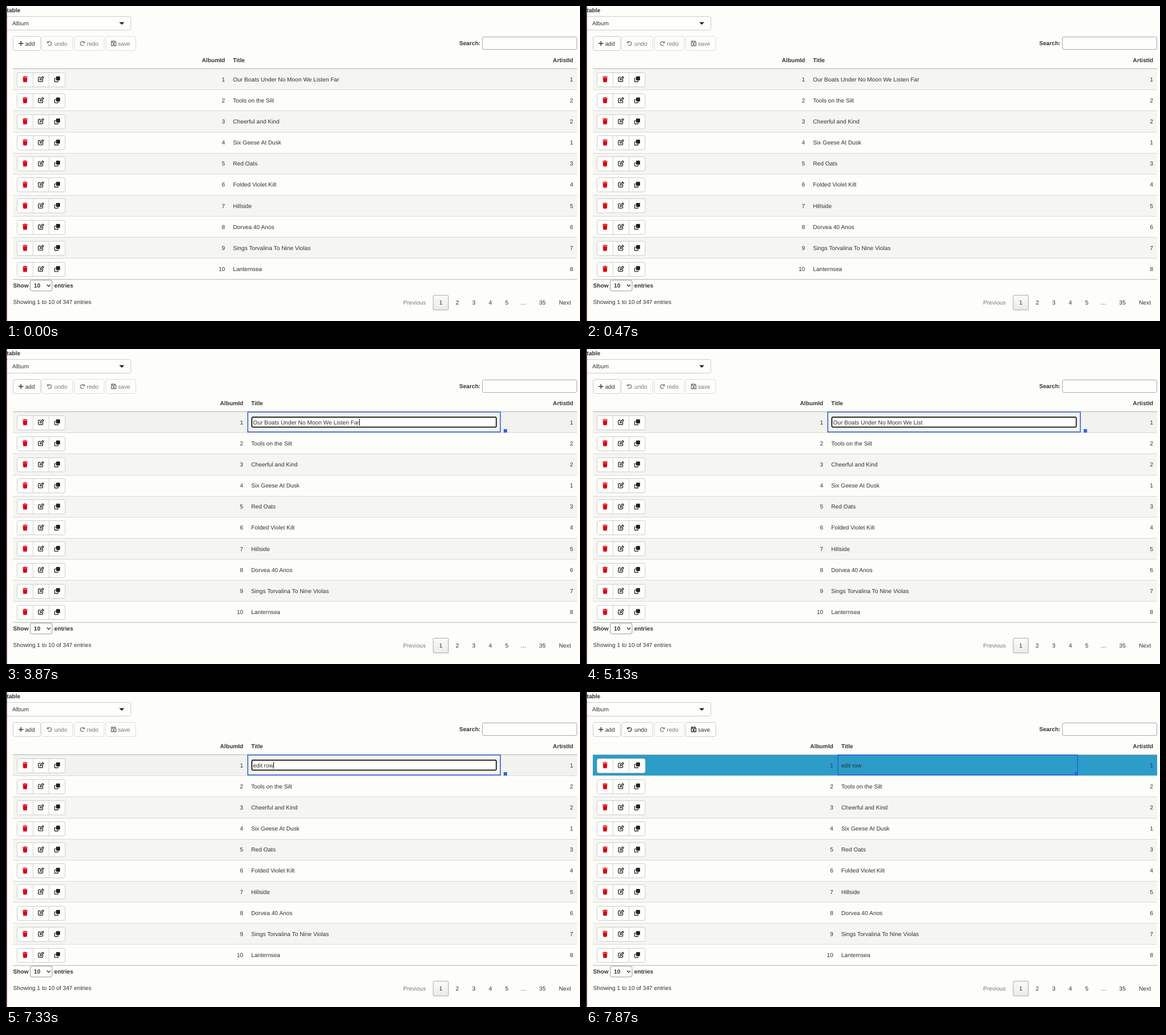
Write an HTML page that moves like this. It is 1009x555 px and loops after 8000 ms.

```html
<!DOCTYPE html>
<html lang="en">
<head>
<meta charset="utf-8">
<title>Editable table</title>
<style>
  html, body { margin: 0; width: 100%; height: 100%; overflow: hidden; background: #fdfdfa; }
  svg { display: block; width: 100%; height: 100%; }
  text { font: 10.2px "Liberation Sans", Arial, sans-serif; fill: #333; white-space: pre; text-rendering: geometricPrecision; }
  .bold { font-weight: bold; }
  .off { opacity: .65; }
  .icon { fill: none; stroke: #333; stroke-width: 1.4; }
</style>
</head>
<body>
<svg id="stage" viewBox="0 0 1009 555">
  <defs>
    <linearGradient id="page" x2="0" y2="1"><stop stop-color="#fbfbf9"/><stop offset="1" stop-color="#ebebe8"/></linearGradient>
    <path id="trash" fill="#e00010" d="M-4.3-4.7h2.6l.6-.8h2.2l.6.8h2.6v1.3h-8.6zM-3.8-2.8h7.6l-.5 7q-.1 1-1 1h-4.6q-.9 0-1-1z"/>
    <g id="edit" class="icon" stroke-width="1.2">
      <path d="M-.5-3.5h-2.7q-1.2 0-1.2 1.2v5.3q0 1.2 1.2 1.2h5.3q1.2 0 1.2-1.2v-2.7"/>
      <path d="M-1.2 1.2l.4-2 4-4 1.7 1.7-4 4z"/>
    </g>
    <g id="copy">
      <path class="icon" d="M-2.5-1.5h-1.2q-.8 0-.8.8v4.4q0 .8.8.8h4.4q.8 0 .8-.8v-1.2"/>
      <rect x="-2" y="-5" width="7" height="7" rx="1.1" fill="#222"/>
    </g>
    <path id="plus" class="icon" d="M-4.2 0h8.4M0-4.2v8.4" stroke-width="1.6"/>
    <g id="turn">
      <path class="icon" d="M-3-1.6a3.5 3.5 0 1 1 .4 4"/>
      <path d="M-4.3-4.2v3.8h3.8z" fill="#333"/>
    </g>
    <g id="disk" class="icon" stroke-width="1.1">
      <path d="M-4-4h6.2l1.8 1.8v6.2h-8z"/>
      <path d="M-2.2-4v2.6h4v-2.6"/>
      <circle cy="1.4" r=".9"/>
    </g>
  </defs>
</svg>
<script>
const LOOP = 8000, PITCH = 37.15, ROW_TOP = 110.6;
const BLUE = '#3161dc';
const titles = [
  'Our Boats Under No Moon We Listen Far', 'Tools on the Silt', 'Cheerful and Kind',
  'Six Geese At Dusk', 'Red Oats', 'Folded Violet Kilt', 'Hillside',
  'Dorvea 40 Anos', 'Sings Torvalina To Nine Violas', 'Lanternsea'
];
const artists = [1, 2, 2, 1, 3, 4, 5, 6, 7, 8];
const stage = document.getElementById('stage');

function add(tag, attrs, parent = stage) {
  const el = document.createElementNS('http://www.w3.org/2000/svg', tag);
  set(el, attrs);
  return parent.appendChild(el);
}
function set(el, attrs) {
  for (const key in attrs) el.setAttribute(key, attrs[key]);
}
function show(el, on) {
  el.style.display = on ? '' : 'none';
}
function label(x, y, content, anchor = 'start', cls = '', parent = stage) {
  const el = add('text', { x, y, 'text-anchor': anchor, class: cls }, parent);
  el.textContent = content;
  return el;
}
function box(x, y, right, bottom, attrs = {}, parent = stage) {
  return add('rect', { x, y, width: right - x, height: bottom - y, fill: '#fefefc', stroke: '#ccc', rx: 3, ...attrs }, parent);
}
function icon(name, x, y, parent = stage, extra = '') {
  return add('use', { href: '#' + name, transform: `translate(${x} ${y}) ${extra}` }, parent);
}
function line(y, stroke) {
  return add('path', { d: `M12 ${y}H1004`, stroke });
}

// Page chrome
box(-4, 18.5, 219.5, 42.5);
add('rect', { width: 1.6, height: 555, fill: '#2c0a20' });
label(1.5, 10.6, 'table', 'start', 'bold');
label(11, 34.2, 'Album');
add('path', { d: 'M199 28.5h9l-4.5 4.4z', fill: '#222' });

function toolButton(left, right, name, content, extra) {
  const g = add('g', {});
  box(left, 53.5, right, 78.5, {}, g);
  icon(name, left + 13.8, 66, g, extra);
  label(right - 9.8, 69.7, content, 'end', '', g);
  return g;
}
toolButton(12.5, 60.5, 'plus', 'add');
const undo = toolButton(62.5, 117.5, 'turn', 'undo');
const redo = toolButton(120.5, 172.5, 'turn', 'redo', 'scale(-1 1)');
const save = toolButton(175.5, 228, 'disk', 'save');
redo.setAttribute('class', 'off');

label(834, 69.2, 'Search:', 'end', 'bold');
box(837.5, 54.5, 1003.5, 76.5, { stroke: '#aaa', rx: 2.5 });

// Table; the id and title columns slide together
const rowFills = titles.map((_, i) => add('rect', {
  x: 12, y: ROW_TOP + i * PITCH, width: 992, height: PITCH, fill: i % 2 ? '#fdfdfa' : '#f5f5f2'
}));
titles.forEach((_, i) => i && line(Math.floor(ROW_TOP + i * PITCH) + .5, '#dadad5'));
line(110.5, '#b4b4a8');
line(481.8, '#b4b4ac');

const columns = add('g', {});
label(385, 99.3, 'AlbumId', 'end', 'bold', columns);
label(399, 99.3, 'Title', 'start', 'bold', columns);
label(997, 99.3, 'ArtistId', 'end', 'bold');

const titleCells = titles.map((title, i) => {
  const mid = 129 + i * PITCH, base = mid + 3.6;
  const top = Math.round(mid - 12.5) + .5;
  box(19.5, top, 104, top + 25);
  add('path', { d: `M47.5 ${top}v25M75.5 ${top}v25`, stroke: '#d4d4d0' });
  icon('trash', 33.5, mid);
  icon('edit', 61.3, mid);
  icon('copy', 90, mid);
  label(385, base, i + 1, 'end', '', columns);
  label(997, base, artists[i], 'end');
  return label(399, base, title, 'start', '', columns);
});

// Cell focus and inline editor
const focus = box(0, 111, 10, 146.2, { fill: 'none', stroke: BLUE, 'stroke-width': 1.6, rx: 0 });
const handle = add('rect', { y: 141.2, width: 6, height: 6, fill: BLUE });
const editor = add('g', {});
box(432.2, 120.2, 861.8, 137.7, { stroke: '#111', 'stroke-width': 1.7, rx: 1.6 }, editor);
const typed = label(434.3, 132.6, '', 'start', '', editor);
const caret = add('rect', { y: 123, width: 1, height: 12, fill: '#111' }, editor);

// Footer
label(12.5, 496, 'Show', 'start', 'bold');
box(42.5, 483, 81, 502, { stroke: '#999' });
label(49, 496, '10', 'start', 'bold');
add('path', { d: 'M72 491l3 3 3-3', class: 'icon' });
label(84.8, 496, 'entries', 'start', 'bold');
label(12.5, 525.3, 'Showing 1 to 10 of 347 entries');
box(751, 509.5, 777.5, 535.5, { fill: 'url(#page)', stroke: '#aaa', rx: 1.5 });
label(718, 525.8, 'Previous', 'middle', 'off');
['1', '2', '3', '4', '5', '…'].forEach((n, i) => label(764.3 + 29 * i, 525.8, n, 'middle'));
label(943, 525.8, '35', 'middle');
label(982.5, 525.8, 'Next', 'middle');

// Timeline
const EDIT = 2600, HOLD = 5130, TYPE = 6600, CLOSE = 7670;
const taps = [4200, 4330, 4470, 4600];
const keys = [[6600, 1], [6730, 2], [6800, 4], [6930, 5], [7130, 6], [7230, 7], [7330, 8]];
const caretOn = [[2730, 3270], [3870, 4600], [6400, CLOSE]];

function editorText(t) {
  if (t >= TYPE) {
    return 'edit row'.slice(0, keys.filter(k => t >= k[0]).pop()[1]);
  }
  let left = titles[0].length - taps.filter(k => t >= k).length;
  if (t >= HOLD) {
    // Held backspace: about 30 deletions a second, shown every 67 ms
    const step = Math.floor((t - HOLD) / 66.6);
    left = Math.max(0, Math.round(31 - step * 22 / 12));
  }
  return titles[0].slice(0, left);
}

function render(t) {
  const editing = t >= EDIT && t < CLOSE, closed = t >= CLOSE;
  const focused = t >= 2470, marked = t >= 7800;
  const [shift, left, right, grip] = closed ? [49.7, 442.8, 864, 859]
    : editing ? [32, 425, 869, 874.8] : [0, 393, 880, 874.8];

  columns.setAttribute('transform', `translate(${shift} 0)`);
  rowFills[0].setAttribute('fill', marked ? '#2c9cc9' : focused ? '#f2f2ef' : '#f5f5f2');
  titleCells[0].textContent = closed ? 'edit row' : titles[0];
  show(titleCells[0], !editing);

  show(focus, focused);
  show(handle, focused);
  set(focus, { x: left, width: right - left });
  handle.setAttribute('x', grip);

  show(editor, editing);
  if (editing) {
    typed.textContent = editorText(t);
    caret.setAttribute('x', 434.3 + typed.getComputedTextLength());
    show(caret, caretOn.some(([from, to]) => t >= from && t < to));
  }
  for (const g of [undo, save]) g.setAttribute('class', t >= 7740 ? '' : 'off');
}

const start = performance.now();
function tick() {
  render((performance.now() - start) % LOOP);
  requestAnimationFrame(tick);
}
tick();
</script>
</body>
</html>
```
